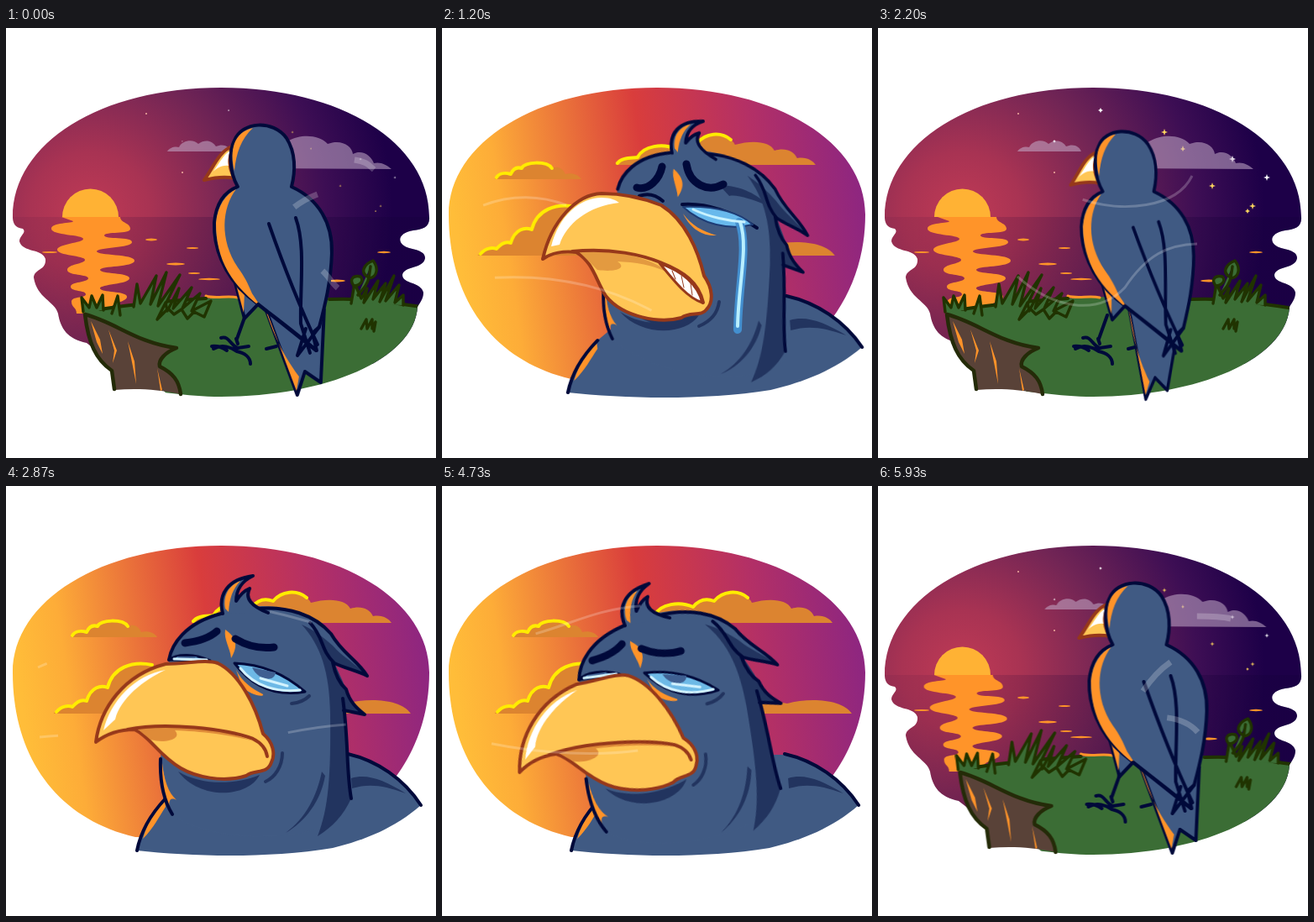
An HTML page without scripts that plays this animation: 512x512 px, repeating every 6000 ms.

```html
<!DOCTYPE html>
<html lang="en">
<head>
<meta charset="utf-8">
<title>Sad bird at sunset</title>
<style>
html, body { margin: 0; width: 100%; height: 100%; overflow: hidden; background: #fff; }
svg { display: block; width: 100vw; height: 100vh; }
path { stroke-linecap: round; stroke-linejoin: round; }
.line { fill: none; stroke: #00093a; stroke-width: 4; }
.blue { fill: #405a83; }
.inked { stroke: #00093a; stroke-width: 4; }
.shade { fill: #22345f; }
.glow { fill: #ff9329; }
.beak { fill: #ffc655; stroke: #96381a; stroke-width: 4; }
.white { fill: #fff; }
.green { fill: #3b6d35; }
.grass { fill: #3b6d35; stroke: #203300; stroke-width: 3.4; }
.haze { fill: #c5aecb; opacity: .55; }
.cloud { fill: #dc8430; }
.rim { fill: none; stroke: #ffec00; stroke-width: 4; }
.wind path { fill: none; stroke: #fff; stroke-opacity: .22; stroke-width: 3; }

/* Every part shares one two-second cycle. */
.far, .near, .pan, .drift, .driftFast, .bird, .tail, .ripple, .stars path,
.clouds, .body, .head, .shut, .open, .tear, .wind path {
  animation: 2s linear infinite;
}
.far { animation-name: far; animation-timing-function: step-end; }
.near { animation-name: near; animation-timing-function: step-end; }
.shut { animation-name: shut; animation-timing-function: step-end; }
.open { animation-name: open; animation-timing-function: step-end; }
@keyframes far { 0%, 76.65% { visibility: visible } 23.35% { visibility: hidden } }
@keyframes near { 0%, 76.65% { visibility: hidden } 23.35% { visibility: visible } }
@keyframes shut { 0%, 100% { opacity: 1 } 50% { opacity: 0 } }
@keyframes open { 0%, 100% { opacity: 0 } 50% { opacity: 1 } }

.pan { animation-name: pan; }
@keyframes pan {
  0%, 100% { transform: none } 10% { transform: translateX(-12px) }
  23.35% { transform: translateX(-24px) } 23.36%, 76.6% { transform: translateX(22px) }
  86.5% { transform: translateX(12.5px) } 96.5% { transform: translateX(3.5px) }
}
.drift { animation-name: drift; }
@keyframes drift {
  0%, 100% { transform: none } 23.35% { transform: translateX(-28px) }
  23.36%, 76.6% { transform: translateX(23px) }
}
.driftFast { animation-name: driftFast; }
@keyframes driftFast {
  0%, 100% { transform: none } 10% { transform: translateX(-26px) }
  23.35% { transform: translateX(-56px) } 23.36%, 76.6% { transform: translateX(44px) }
}
.bird { animation-name: bird; transform-origin: 390px 400px; }
@keyframes bird {
  0%, 76%, 100% { transform: none }
  10%, 24% { transform: translateX(3px) skewX(1.4deg) scale(.95, .973) }
}
.tail { animation-name: tail; transform-origin: 320px 310px; }
@keyframes tail {
  0%, 76%, 100% { transform: none }
  10%, 24% { transform: rotate(9deg) translateY(4px) scaleX(.9) }
}
.ripple { animation-name: ripple; animation-timing-function: ease-in-out; }
@keyframes ripple { 0%, 100% { transform: none } 10%, 86% { transform: translateX(5px) } }
.stars path { animation-name: twinkle; fill: #ffd75e; transform-box: fill-box; transform-origin: center; }
.stars .pale { fill: #fff; }
@keyframes twinkle { 0%, 94% { transform: scale(.35) } 10%, 24% { transform: none } 86% { transform: scale(.6) } }

.clouds { animation-name: clouds; }
@keyframes clouds { from { transform: translateX(37.4px) } to { transform: translateX(-48.6px) } }
.body { animation-name: body; transform-origin: 325px 440px; animation-timing-function: ease-in-out; }
@keyframes body { 0%, 36.5% { transform: scaleX(1.012) } 43.5% { transform: none } 60%, 100% { transform: scaleX(1.036) } }
.head { animation-name: head; }
@keyframes head {
  0%, 24% { transform: matrix(.985, -.171, .171, .985, -66, 64) }
  36.5% { transform: matrix(.988, -.156, .156, .988, -61, 56.5) }
  43.5% { transform: none }
  50% { transform: matrix(.985, .09, -.035, .985, 20, -28) }
  60% { transform: matrix(.9625, .155, -.0557, .9646, 34, -37.8) }
  68% { transform: matrix(.9625, .155, -.0557, .9646, 34, -35) }
  76%, 100% { transform: matrix(.9625, .155, -.0557, .9646, 34, -38) }
}
.tear { animation-name: tear; stroke-dasharray: 100; }
@keyframes tear { 0%, 50% { stroke-dashoffset: 100 } 60%, 100% { stroke-dashoffset: 0 } }

/* Gusts run along their paths; each path has length 100. */
.gust path { animation-name: gust; stroke-linecap: butt; }
@keyframes gust {
  0% { stroke-dasharray: 0 87 10 200; stroke-width: 7 }
  5% { stroke-dasharray: 0 100 0 200; stroke-width: 7 }
  5.1%, 76% { stroke-dasharray: 0 0 0 200; stroke-width: 3 }
  86.5% { stroke-dasharray: 0 6 52 200; stroke-width: 3 }
  96.5% { stroke-dasharray: 0 74 15 200; stroke-width: 7 }
  100% { stroke-dasharray: 0 87 10 200; stroke-width: 7 }
}
.swirl path { animation-name: swirl; stroke-linecap: butt; }
@keyframes swirl {
  0%, 4% { stroke-dasharray: 0 0 0 200 } 10% { stroke-dasharray: 0 0 100 200 }
  20%, 100% { stroke-dasharray: 0 100 0 200 }
}
.early path { animation-name: early; stroke-linecap: butt; }
@keyframes early {
  0%, 27% { stroke-dasharray: 0 0 0 200 } 36.5% { stroke-dasharray: 0 5 45 200 }
  43.5% { stroke-dasharray: 0 77 18 200 } 48%, 100% { stroke-dasharray: 0 100 0 200 }
}
.late path { animation-name: late; stroke-linecap: butt; }
@keyframes late {
  0%, 42% { stroke-dasharray: 0 0 0 200 } 43.5% { stroke-dasharray: 0 0 6 200 }
  60% { stroke-dasharray: 0 6 54 200 } 72%, 100% { stroke-dasharray: 0 100 0 200 }
}
</style>
</head>
<body>
<svg viewBox="0 0 512 512">
<defs>
  <radialGradient id="dusk" gradientUnits="userSpaceOnUse" cx="100" cy="220" r="360">
    <stop offset="0" stop-color="#c03a55"/><stop offset=".2" stop-color="#a83353"/>
    <stop offset=".48" stop-color="#722555"/><stop offset=".78" stop-color="#3d0e54"/>
    <stop offset="1" stop-color="#1d0048"/>
  </radialGradient>
  <linearGradient id="depth">
    <stop offset="0" stop-color="#200030" stop-opacity=".06"/><stop offset="1" stop-color="#14003c" stop-opacity=".35"/>
  </linearGradient>
  <linearGradient id="sunset" gradientUnits="userSpaceOnUse" x1="20" y1="270" x2="500" y2="200">
    <stop offset="0" stop-color="#ffbd39"/><stop offset=".12" stop-color="#fdac38"/>
    <stop offset=".48" stop-color="#d93d3c"/><stop offset=".75" stop-color="#b43065"/>
    <stop offset="1" stop-color="#8e2680"/>
  </linearGradient>
  <clipPath id="bay">
    <path d="M8 225C8 137 112 71 256 71S504 137 504 225C505 237 496 240 485 241C466 244 464 257 480 262C494 265 499 268 499 274C497 287 474 283 472 294C472 305 494 302 497 315C497 322 493 327 490 332C486 395 380 439 256 439C210 439 180 430 128 431L118 392L96 375C73 370 65 358 62 340C58 325 37 322 33 297C34 286 48 289 47 275C43 262 20 268 16 254C16 247 25 244 20 239C10 238 8 231 8 225Z"/>
  </clipPath>
  <clipPath id="oval">
    <path d="M8 222C8 137 112 71 256 71S504 137 504 222C504 350 400 440 256 440C230 440 190 440 153 436L154 418C60 396 8 322 8 222Z"/>
  </clipPath>
</defs>

<g class="far">
  <g clip-path="url(#bay)">
    <path fill="url(#dusk)" d="M0 60H512V400H0Z"/>
    <path fill="url(#depth)" d="M0 225H512V400H0Z"/>
    <g class="stars">
      <path d="M341 120l1 3 3 1-3 1-1 3-1-3-3-1 3-1z"/>
      <path d="M398 184l1 3 3 1-3 1-1 3-1-3-3-1 3-1z"/>
      <path d="M446 208l1 3 3 1-3 1-1 3-1-3-3-1 3-1z"/>
      <path d="M363 140l1 3 2 1-2 1-1 2-1-2-2-1 2-1z"/>
      <path d="M440 215l1 2 2 1-2 1-1 2-1-2-2-1 2-1z"/>
      <path class="pale" d="M463 174l1 3 3 1-3 1-1 3-1-3-3-1 3-1z"/>
      <path class="pale" d="M422 152l1 3 3 1-3 1-1 3-1-3-3-1 3-1z"/>
      <path class="pale" d="M265 95l1 2 2 1-2 1-1 2-1-2-2-1 2-1z"/>
      <path class="pale" d="M210 133l.7 1.3 1.3.7-1.3.7-.7 1.3-.7-1.3-1.3-.7 1.3-.7z"/>
    </g>
    <circle cx="167" cy="102" r="1" fill="#f3b0a0"/><circle cx="210" cy="172" r="1" fill="#f3b0a0"/>
    <path class="haze driftFast" d="M192 147C196 141 203 141 206 142C210 133 224 132 229 138C237 132 246 134 250 141C259 137 266 141 268 147Z"/>
    <path class="haze drift" d="M300 167C306 157 318 157 323 150C328 129 367 121 383 138C399 132 412 140 413 150C424 144 435 152 438 161C446 159 453 163 459 168Z"/>

    <path fill="#ffb234" d="M67 225A33.5 33.5 0 0 1 134 225Z"/>
    <path class="ripple" fill="#ff9429" d="M66 225H136C136 232 148 232 148 239S117 242 117 247S150 248 150 255S108 261 108 266S153 269 153 277S112 283 112 288S147 291 147 298S112 305 112 310S144 313 144 320S122 326 122 340H84C84 332 78 333 78 326S95 322 95 317S77 314 77 308S98 303 98 298S73 295 73 288S94 281 94 276S61 271 61 264S92 256 92 251S54 247 54 239S80 233 80 230Z"/>
    <g fill="#ff9429">
      <ellipse cx="173" cy="252" rx="7" ry="1.4"/><ellipse cx="202" cy="281" rx="11" ry="1.5"/>
      <ellipse cx="224" cy="292" rx="7" ry="1"/><ellipse cx="242" cy="299" rx="13" ry="1.2"/>
      <ellipse cx="450" cy="267" rx="8" ry="1.2"/><ellipse cx="394" cy="301" rx="10" ry="1.4"/>
      <ellipse cx="52" cy="267" rx="9" ry="1.1"/><ellipse cx="222" cy="262" rx="7" ry="1"/>
    </g>
  </g>

  <g clip-path="url(#bay)"><g class="pan">
    <path class="green" d="M92 337C130 333 180 326 240 322C310 318 420 318 520 336V450H206Z"/>
    <path fill="none" stroke="#ff9429" stroke-width="3" d="M238 319C250 323 263 318 276 321"/>
    <path fill="none" stroke="#203300" stroke-width="4" d="M112 335C150 329 190 325 238 322M385 323C430 321 460 327 520 336"/>
    <path class="grass" d="M92 338L90 321L99 333L102 319L108 333L115 318L116 336M126 340L133 319L136 342M152 332L156 305L160 328L179 295L172 329L191 291L181 331L207 294L188 333"/>
    <path class="grass" d="M180 347L190 327L192 337L206 310L199 334L221 309L210 334L231 316L221 337L244 325L236 344L224 338L216 346L209 335L200 341L193 334Z"/>
    <path class="grass" d="M411 328L415 304L423 322L430 310L426 327L443 301L437 323L452 304L445 326L462 295L452 325L468 306L463 327L473 318V330"/>
    <path class="grass" stroke-width="3" d="M419 318C427 309 431 304 432 297C420 291 427 281 437 277C444 286 442 297 432 298L434 284M414 307C408 299 414 294 422 296C427 301 421 307 414 307"/>
    <path class="grass" d="M423 358L429 347L430 358L436 347V358L440 350L438 361"/>
  </g></g>
  <g class="pan">
    <path fill="#594238" d="M94 341C130 350 155 375 203 381C190 386 181 395 183 403C199 411 206 420 208 436C180 430 155 429 129 431L126 408C107 395 98 375 94 341Z"/>
    <path class="glow" d="M101 349L108 374L115 388L112 371ZM122 359L129 384L127 399L132 384ZM145 373L151 403L155 424L153 397ZM180 405L184 432L186 431Z"/>
    <path fill="none" stroke="#242b08" stroke-width="4.5" d="M129 430L126 408C107 395 98 375 94 341C130 350 155 375 203 381C190 386 181 395 183 403C199 411 206 420 208 436"/>

    <path class="line" d="M285 342L275 370M247 382C257 376 268 380 275 385C284 387 291 392 291 400M245 379C253 378 260 382 263 384M256 369C266 366 267 378 276 381L289 379M274 370L276 376M310 382L322 379"/>
    <g class="bird">
      <path class="blue inked" d="M270 292L284 346L303 326Z"/>
      <path class="glow" d="M272 298L283 339L284 315Z"/>
      <g class="tail">
        <path class="blue inked" d="M302 315L347 437L356 409L375 422L379 335Z"/>
        <path class="glow" d="M305 323C317 360 325 382 349 415L346 432Z"/>
      </g>
      <path class="beak" d="M236 181C248 164 254 147 269 141C264 155 266 168 272 179C260 176 248 178 236 181Z"/>
      <path class="white" d="M244 174C253 164 258 151 267 146C264 154 264 161 265 164C256 163 249 168 244 174Z"/>
      <path class="blue inked" d="M276 189C265 170 266 145 272 134C281 111 318 109 334 131C345 148 345 170 340 189C373 204 389 233 388 268C387 302 380 330 373 356L365 363L370 384C340 359 310 337 288 319C258 293 247 259 248 232C250 210 260 195 276 189Z"/>
      <path class="glow" d="M274 192C257 214 254 252 276 285C284 296 288 304 293 316C300 327 304 332 310 337C268 307 250 276 250 232C252 211 262 198 274 192ZM272 170C266 146 271 124 294 119C280 132 274 149 272 170Z"/>
      <path class="line" d="M313 233C328 276 347 326 371 377M345 226C357 259 350 306 351 352M373 356L347 390L357 358M351 352L362 387M300 329L369 384"/>
    </g>
  </g>
  <g class="wind gust">
    <path pathLength="100" d="M186 202C250 171 320 155 380 155S428 165 445 173"/>
    <path pathLength="100" d="M146 229C220 265 270 275 328 275S380 304 402 314"/>
    <path pathLength="100" d="M102 255C170 285 220 285 275 287C310 280 310 215 380 195"/>
  </g>
  <g class="wind swirl">
    <path pathLength="100" d="M243 204C290 220 355 215 374 176"/>
    <path pathLength="100" d="M165 295C205 332 260 345 294 309C320 270 345 258 380 257"/>
  </g>
</g>

<g class="near">
  <g clip-path="url(#oval)">
    <path fill="url(#sunset)" d="M0 60H512V418H0Z"/>
    <g class="clouds">
      <path class="cloud" d="M77 180C80 175 89 172 96 174C100 165 106 166 109 167C112 159 139 158 145 167C152 164 158 167 161 174C169 172 177 175 180 180Z"/>
      <path class="rim" d="M79 178C82 173 89 172 96 174C100 165 106 166 109 167C112 159 139 158 145 167"/>
      <path class="cloud" d="M221 163C228 154 239 155 247 154C254 140 277 137 293 144C301 134 310 134 318 137C331 120 357 126 363 139C384 133 405 135 410 146C422 142 433 146 437 155C448 153 456 158 459 163Z"/>
      <path class="rim" d="M223 161C228 154 239 155 247 154C254 140 277 137 293 144C301 134 310 134 318 137C328 125 346 123 358 133"/>
      <path class="cloud" d="M57 271C62 261 72 261 79 263C86 255 91 254 96 256C101 239 113 237 121 240C127 216 154 208 176 214L270 235L405 259C430 252 470 253 482 271Z"/>
      <path class="rim" stroke-width="5" d="M60 269C66 262 74 261 79 263C86 255 91 254 96 256C101 239 113 237 121 240C127 216 150 208 174 213"/>
    </g>
  </g>
  <g class="body">
    <path class="blue" d="M156 434C161 408 175 388 190 372L250 320H407C440 326 474 350 494 380C463 407 429 421 389 431C310 444 220 441 156 434Z"/>
    <path class="glow" d="M163 420C169 400 176 387 189 374L190 382C182 394 176 407 163 420Z"/>
    <path class="shade" d="M411 348C430 342 450 350 476 366C449 356 432 354 412 360Z"/>
    <path class="line" d="M156 434C161 408 175 388 190 372M407 319C442 327 474 349 494 380"/>
  </g>
  <g class="head">
    <path class="blue" d="M194 207C197 189 213 163 256 152C307 133 360 146 387 176C400 199 418 207 430 226L391 211L405 242C409 257 418 265 427 272L402 267C409 304 405 338 411 382C370 432 235 425 198 391L184 325Z"/>
    <path class="shade" d="M352 165C368 172 380 182 389 190C400 203 417 212 430 226L391 211L405 242C409 257 418 265 427 272L402 267C409 304 405 338 411 372C401 393 390 405 371 417C384 384 387 345 386 270C385 222 375 190 352 165Z"/>
    <path class="shade" d="M205 340C235 358 275 355 302 344C288 372 230 374 205 340ZM376 340C370 370 357 395 333 413C356 400 375 375 380 345Z"/>
    <path class="glow" d="M186 330C188 350 193 365 203 374C194 369 192 377 197 391C187 375 183 350 186 330ZM261 171C274 180 277 190 268 205C267 193 259 183 261 171Z"/>
    <path class="line" d="M194 207C197 189 213 163 256 152M300 146C335 143 367 153 387 176M362 163C379 181 374 195 391 211C404 217 418 220 430 226C418 207 400 199 387 176M389 210C392 225 397 235 405 242C409 257 418 265 427 272L402 267M401 253C408 304 405 338 411 372M184 325C183 350 187 373 198 391"/>
    <path class="blue inked" d="M258 152C252 129 264 111 294 107C281 113 274 124 274 137C279 129 285 124 290 122C284 134 292 143 312 151"/>
    <path class="glow" d="M261 146C258 130 266 118 279 113C270 123 266 133 265 150Z"/>

    <g class="shut">
      <path fill="none" stroke="#00093a" stroke-width="9" d="M213 187C229 185 242 181 251 173M273 182C288 191 304 194 319 192"/>
      <path fill="#6db9e6" stroke="#00093a" stroke-width="3" d="M194 207C204 199 225 200 243 208ZM272 211C300 212 330 222 356 245C322 251 294 240 272 211Z"/>
      <path fill="#3f5f91" d="M203 203H228L220 208H208ZM293 216L321 222C320 234 300 232 293 216Z"/>
      <path fill="none" stroke="#d3f3ff" stroke-width="3" d="M200 206L239 207M279 217C296 239 323 246 350 243M303 229L335 238"/>
      <path class="glow" d="M274 219C281 233 292 241 306 248C307 253 288 247 281 239Z"/>
      <path class="beak" d="M107 305C112 265 140 225 190 212C215 212 238 206 252 211C277 223 297 260 306 295C318 305 321 319 316 329C311 344 296 337 286 345C258 354 225 346 208 336C181 320 172 299 153 290C136 290 120 295 107 305Z"/>
      <path class="white" d="M116 291C124 257 153 225 190 219C164 231 136 253 130 278Z"/>
      <path fill="#df8b38" d="M156 289C205 280 263 291 298 305C270 296 230 292 201 291C211 302 188 307 172 302Z"/>
      <path fill="none" stroke="#96381a" stroke-width="4" d="M145 290C190 281 261 289 294 301C306 307 310 315 311 322"/>
      <path class="line" stroke-width="2" style="stroke:#22345f" d="M329 318C329 334 320 347 309 352M340 259C350 258 356 255 361 250"/>
    </g>

    <!-- Open beak is drawn in its settled pose, then undone back into head space. -->
    <g class="open" transform="matrix(1.0294 -.1654 .0594 1.0272 -32.75 44.45)">
      <path class="shade" d="M330 187C358 188 377 199 387 211C368 204 352 198 342 200Z"/>
      <path class="shade" d="M212 338C240 356 280 355 306 342C290 366 238 368 212 338Z"/>
      <path fill="none" stroke="#00093a" stroke-width="9" d="M232 190C246 194 259 180 262 165M291 162C295 187 317 196 335 186"/>
      <path class="line" d="M235 200C246 196 255 199 263 206M286 210C315 208 347 219 375 238"/>
      <path fill="#68b9ec" stroke="#1d3b74" stroke-width="2" d="M287 213C316 212 349 216 370 234C342 241 310 234 287 213Z"/>
      <path class="tear" pathLength="100" fill="none" stroke="#438fcf" stroke-width="10" d="M354 231C365 260 353 304 352 359"/>
      <path class="tear" pathLength="100" fill="none" stroke="#b9efff" stroke-width="4" d="M355 231C365 260 353 304 352 355"/>
      <path fill="none" stroke="#c9f3ff" stroke-width="3" d="M299 216C318 225 342 230 360 231"/>
      <path class="glow" d="M287 221C297 235 310 242 327 247C312 248 297 241 287 221Z"/>
      <path class="beak" d="M120 275C130 230 160 198 190 197C222 197 246 205 261 211C290 229 305 265 312 295C322 309 324 326 315 335C309 344 295 337 285 345C260 352 216 345 195 319C183 300 180 279 160 267C145 265 130 268 120 275Z"/>
      <path class="white" d="M130 260C139 224 164 202 190 202C201 202 207 205 211 208C174 212 148 233 140 258Z"/>
      <path fill="#e39a40" d="M164 267C204 262 250 273 274 294C252 281 228 279 209 278C221 286 207 291 185 288Z"/>
      <path fill="#fff" stroke="#96381a" stroke-width="3" d="M259 280C279 287 303 300 310 327C292 321 277 302 259 280Z"/>
      <path fill="none" stroke="#96381a" d="M274 289L278 299M285 295L288 309M296 304L298 318"/>
      <path fill="none" stroke="#96381a" stroke-width="4" d="M155 266C202 261 240 271 260 279C288 290 306 303 311 327"/>
      <path class="line" stroke-width="2" style="stroke:#22345f" d="M330 326C328 341 318 350 306 355"/>
    </g>
  </g>
  <g class="wind early">
    <path pathLength="100" d="M96 180C150 167 180 147 235 143S330 154 378 166"/>
    <path pathLength="100" d="M38 302C110 320 190 322 240 314S350 285 424 283"/>
  </g>
  <g class="wind late">
    <path pathLength="100" d="M38 216C75 198 115 198 148 211S190 222 220 232"/>
    <path pathLength="100" d="M40 299C110 292 180 300 245 334S330 345 385 325"/>
  </g>
</g>
</svg>
</body>
</html>
```
